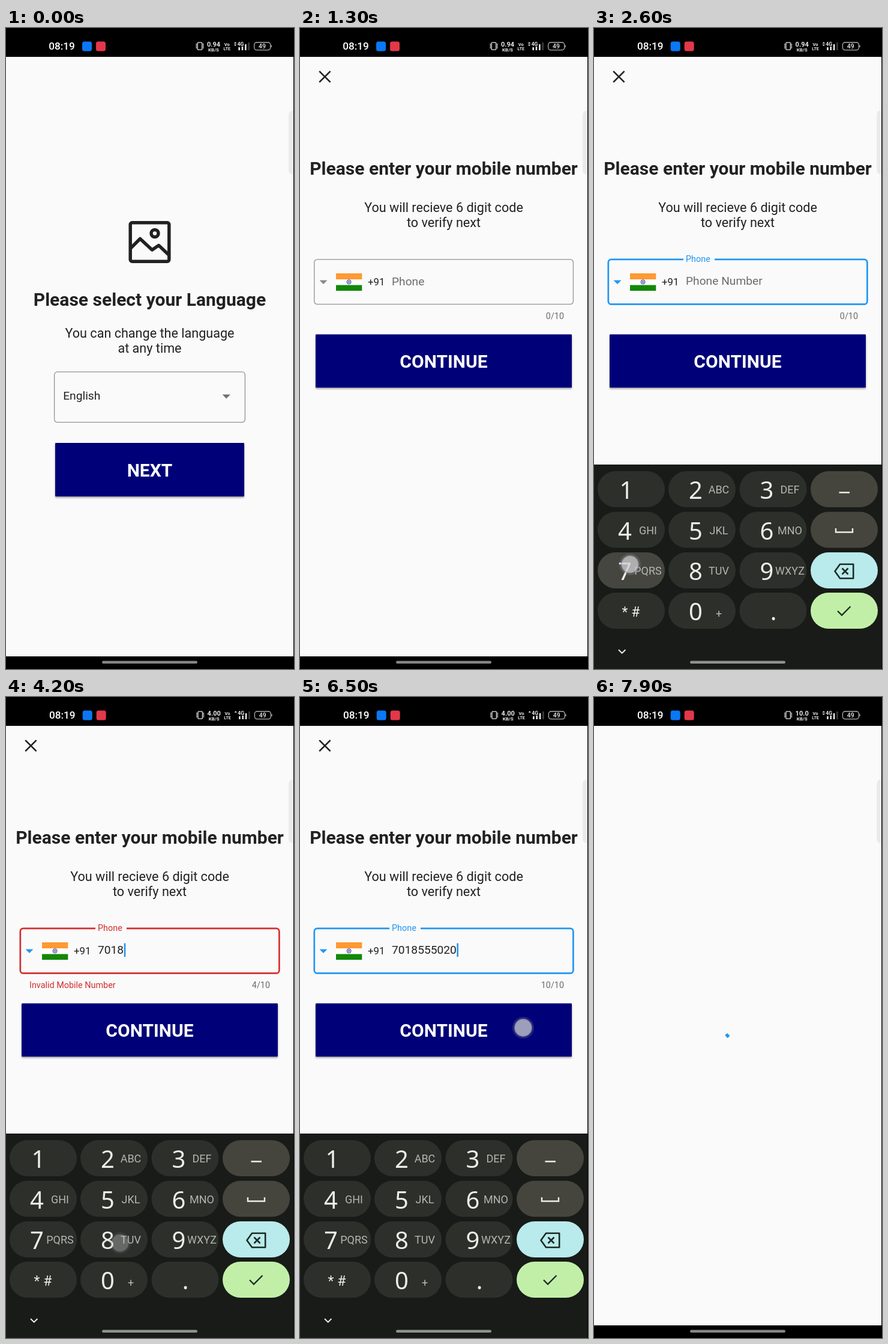
Write an HTML page that moves like this. It is 480 px wide and 1066 px high and loops after 8 s.

```html
<!DOCTYPE html>
<html lang="en">
<head>
<meta charset="utf-8">
<title>Phone sign-in</title>
<style>
  html, body { margin: 0; width: 100%; height: 100%; overflow: hidden; background: #000; }
  svg { display: block; width: 480px; height: 1066px; font: 19.2px Roboto, sans-serif; fill: #212121; }
  .mid { text-anchor: middle; }
  .end { text-anchor: end; }
  .title { font-size: 30px; font-weight: 700; text-anchor: middle; }
  .sub { font-size: 21.6px; text-anchor: middle; }
  .small { font-size: 14.4px; }
  .on { fill: #fff; }
  .grey { fill: #6c6c6c; }
  .line { fill: none; stroke: #212121; }
  .button { fill: #000078; filter: drop-shadow(0 2px 1.5px #0006); }
  .digit { font: 40px "Noto Sans", sans-serif; fill: #eceee8; text-anchor: middle; }
  .letters { font-size: 18px; fill: #b4b6b1; text-anchor: middle; }
  .bar { font-weight: 700; fill: #e8e8e8; text-anchor: middle; }
</style>
</head>
<body>
<svg viewBox="0 0 480 1066">
  <rect width="479" height="1066" fill="#fafafa"/>

  <g id="language">
    <g class="line" stroke-width="5.5" stroke-linejoin="round">
      <rect x="207.2" y="323.7" width="64.6" height="64.6" rx="3"/>
      <circle cx="248" cy="341.5" r="6"/>
      <path d="M207 367L223.5 350.5L243.5 369L254.5 361.5L272 378"/>
    </g>
    <text class="title" x="239.5" y="462">Please select your Language</text>
    <text class="sub" x="239.5" y="514.5">You can change the language</text>
    <text class="sub" x="239.5" y="540">at any time</text>
    <rect x="80.6" y="571.9" width="317.8" height="83.8" rx="5" class="line" style="stroke:#929292" stroke-width="1.3"/>
    <text x="95.2" y="618.3">English</text>
    <path d="M360.5 609.6h13.4l-6.7 6.7z" fill="#707070"/>
    <rect class="button" x="82" y="690" width="315" height="89" rx="1"/>
    <text class="title on" x="239.5" y="745.5">NEXT</text>
  </g>

  <g id="phone">
    <rect y="48" width="479" height="1000" fill="#fafafa"/>
    <path d="M32.2 71.8l18.4 18.4M50.6 71.8l-18.4 18.4" class="line" stroke-width="2.6"/>
    <text class="title" x="239.5" y="244">Please enter your mobile number</text>
    <text class="sub" x="239.5" y="305.7">You will recieve 6 digit code</text>
    <text class="sub" x="239.5" y="331">to verify next</text>
    <rect id="box" x="23.8" y="384.8" width="431.6" height="74.6" rx="5" fill="none"/>
    <rect id="gap" x="149" y="380" width="52" height="9" fill="#fafafa"/>
    <path id="arrow" d="M32.5 419.4h13l-6.5 6.6z"/>
    <rect x="60" y="408" width="43.3" height="10" fill="#ff9933"/>
    <rect x="60" y="418" width="43.3" height="9.5" fill="#fff"/>
    <rect x="60" y="427.5" width="43.3" height="9.5" fill="#138808"/>
    <circle cx="81.6" cy="422.3" r="3.5" fill="#c9c9ee" stroke="#3a3aa0"/>
    <circle cx="81.6" cy="422.3" r="1.1" fill="#3a3aa0"/>
    <text x="113" y="428.4" font-size="16.8">+91</text>
    <text id="label" x="153"></text>
    <text id="hint" class="grey" x="153" y="427">Phone Number</text>
    <text id="number" x="153" y="427.3"></text>
    <rect id="cursor" y="409.5" width="2.6" height="22.5" fill="#2196f3"/>
    <text id="error" class="small" x="39" y="484" fill="#d32f2f">Invalid Mobile Number</text>
    <text id="count" class="small grey end" x="440" y="484"></text>
    <rect class="button" x="26" y="509.5" width="427" height="88.5" rx="1"/>
    <text class="title on" x="239.5" y="564.5">CONTINUE</text>
  </g>

  <path id="spinner" fill="none" stroke="#2196f3" stroke-width="5.33" stroke-linecap="square"/>

  <rect y="1045" width="480" height="21" fill="#000"/>
  <path d="M479 137.5h-1.5q-6.5 0-6.5 8v89.5q0 8 6.5 8h1.5z" fill="#ebebeb"/>
  <g id="keyboard">
    <rect y="726" width="479" height="342" fill="#181b17"/>
    <g id="keys"></g>
    <g class="line" style="stroke:#eceee8" stroke-width="2.4">
      <path d="M408.5 772.5h17.5M403 832v6.5h28v-6.5"/>
      <path d="M41 1034l5.7 5.7l5.7-5.7" stroke-width="2"/>
    </g>
    <g class="line" style="stroke:#1c2a22" stroke-width="2.6">
      <path d="M401.5 903.5l8.5-11.7h22.2v23.4h-22.2zM413.5 898.5l10 10M423.5 898.5l-10 10" stroke-linejoin="round"/>
      <path d="M406 969.5l7 7l14.5-14.5" stroke-width="2.3"/>
    </g>
  </g>
  <rect x="160" y="1052.5" width="159" height="4.4" rx="2.2" fill="#fff" opacity=".52"/>

  <rect width="480" height="48" fill="#000"/>
  <g id="status">
    <text class="on" x="71.2" y="36.4" font-size="17.2" font-weight="500">08:19</text>
    <rect x="127" y="22.5" width="16" height="16" rx="3.5" fill="#0a78f5"/>
    <rect x="150" y="22.5" width="16" height="16" rx="3.5" fill="#e2384a"/>
    <g fill="none" stroke="#e8e8e8" stroke-width="1.3">
      <rect x="319.3" y="24.2" width="7.4" height="12" rx="1"/>
      <path d="M317.3 26v8M328.7 26v8" stroke-dasharray="2.4 .6"/>
      <rect x="413.7" y="24" width="27" height="12.6" rx="4" stroke="#b0b0b0"/>
      <path d="M442.3 28.5v3.5" stroke="#b0b0b0"/>
    </g>
    <text id="speed" class="bar" x="346" y="30.8" font-size="11"></text>
    <text class="bar" x="346" y="38.5" font-size="8">KB/S</text>
    <text class="bar" x="368.3" y="30" font-size="7.5">Vo</text>
    <text class="bar" x="368.3" y="37" font-size="7">LTE</text>
    <text class="bar" x="391" y="30" font-size="8.5">4G</text>
    <path d="M379.8 25.8l2.3-2.6l2.3 2.6z" fill="#e8e8e8"/>
    <path id="down" d="M379.8 27.4l2.3 2.6l2.3-2.6z" fill="#e8e8e8"/>
    <path d="M388.7 37v-5M394 37v-6M399.4 37v-10" stroke="#e8e8e8" stroke-width="2.6"/>
    <path d="M404.7 37v-13" stroke="#3c3c3c" stroke-width="2.6"/>
    <text class="bar" x="427" y="34.2" font-size="10.5" style="font-weight:500">49</text>
  </g>

  <g id="touch">
    <circle r="18" fill="#9a9aa8" opacity=".25"/>
    <circle r="14.3" fill="#d2d2d4" fill-opacity=".8" stroke="#8a8a96" stroke-width="1.2"/>
  </g>
</svg>
<script>
const $ = id => document.getElementById(id);
const set = (id, attrs) => { for (const k in attrs) $(id).setAttribute(k, attrs[k]); };
const show = (id, on) => set(id, { visibility: on ? 'visible' : 'hidden' });
const clamp = v => Math.min(1, Math.max(0, v));
const mix = (a, b, p) => a + (b - a) * p;
const easeOut = p => 1 - (1 - clamp(p)) ** 3;

// Keypad
const COLS = [6, 124, 242.5, 361], ROWS = [737, 804.5, 872, 939];
const LETTERS = ['+', '', 'ABC', 'DEF', 'GHI', 'JKL', 'MNO', 'PQRS', 'TUV', 'WXYZ'];
const SIDE = ['#45453d', '#45453d', '#b9eaec', '#c2efa8'];
const PLAIN = '#2d2f2b';
const keyCell = d => d ? [(d - 1) % 3, Math.floor((d - 1) / 3)] : [1, 3];
const text = (cls, x, y, s) => `<text class="${cls}" x="${x}" y="${y}">${s}</text>`;
let keys = '';
ROWS.forEach((y, r) => COLS.forEach((x, c) => {
  keys += `<rect id="key${c}${r}" x="${x}" y="${y}" width="112" height="60" rx="30" fill="${c > 2 ? SIDE[r] : PLAIN}"/>`;
}));
LETTERS.forEach((s, d) => {
  const [c, r] = keyCell(d), x = COLS[c], y = ROWS[r];
  keys += text('digit', x + (d == 1 ? 48 : 45.5), y + 46, d);
  keys += text('letters', x + 84, y + (d ? 37.3 : 41), s);
});
keys += `<text x="61.5" y="979" class="mid" font-size="23" fill="#eceee8">* #</text>` + text('digit', 299, 985, '.');
$('keys').innerHTML = keys;

// Taps: [time, x, y, digit]
const press = (time, d, dx = 62, dy = 34) => {
  const [c, r] = keyCell(d);
  return [time, COLS[c] + dx, ROWS[r] + dy, d];
};
const TAPS = [
  [100, 246, 729], [1700, 262, 424],
  press(2600, 7, 54, 20), press(3000, 0, 62, 22), press(3800, 1), press(4100, 8, 66, 36), press(4400, 5),
  press(4700, 5), press(5000, 5), press(5300, 0), press(5500, 2, 78, 38), press(6100, 0),
  [6500, 372, 550]
];
const DIGITS = TAPS.filter(tap => tap.length > 3);

// Material standard curve, cubic-bezier(.4, 0, .2, 1)
function standard(x) {
  x = clamp(x);
  let lo = 0, hi = 1;
  for (let i = 0; i < 20; i++) {
    const u = (lo + hi) / 2, v = 1 - u;
    if (1.2 * v * v * u + .6 * v * u * u + u ** 3 < x) lo = u; else hi = u;
  }
  return 3 * (1 - lo) * lo * lo + lo ** 3;
}

function drawSpinner(t) {
  show('spinner', t >= 6600);
  if (t < 6600) return;
  const time = (t - 6579) * 1.039, cycle = time / 1333 % 1;
  const head = standard(cycle * 2), tail = standard(cycle * 2 - 1);
  const start = Math.PI * (-.5 + 1.5 * tail + 2 * time / 2222 + .5 * cycle);
  const sweep = Math.max(1.5 * Math.PI * (head - tail), .01);
  const cy = mix(387, 546.6, easeOut((t - 6570) / 485));
  const at = a => `${239.5 + 23.8 * Math.cos(a)} ${cy + 23.8 * Math.sin(a)}`;
  set('spinner', { d: `M${at(start)}A23.8 23.8 0 ${+(sweep > Math.PI)} 1 ${at(start + sweep)}` });
}

function drawField(t) {
  const focus = t >= 1800, float = standard((t - 1700) / 200);
  const typed = DIGITS.filter(tap => t >= tap[0] + 100), n = typed.length;
  const bad = n > 0 && n < 10, accent = bad ? '#d32f2f' : '#2196f3';
  set('box', { stroke: focus ? accent : '#929292', 'stroke-width': focus ? 2.7 : 1.3 });
  set('arrow', { fill: focus ? '#2196f3' : '#888' });
  set('label', { y: mix(428, 389, float), 'font-size': mix(19.2, 14.4, float), fill: focus ? accent : '#6c6c6c' });
  set('hint', { opacity: n ? 0 : clamp((t - 1800) / 200) });
  show('gap', focus);
  show('error', bad);
  $('label').textContent = 'Phone';
  $('number').textContent = typed.map(tap => tap[3]).join('');
  $('count').textContent = n + '/10';
  const since = t - (n ? typed[n - 1][0] + 100 : 1700);
  set('cursor', { x: 153.6 + 10.78 * n, opacity: +(focus && since % 1000 < 500) });
}

function drawTouch(t) {
  const [time, x, y] = TAPS.filter(tap => tap[0] <= t).pop() || [-1e4, 0, 0];
  const alpha = [.9, .42, .12][(t - time) / 100] || 0;
  set('touch', { transform: `translate(${x} ${y})`, opacity: alpha });
  DIGITS.forEach(([, , , d]) => set('key' + keyCell(d).join(''), { fill: PLAIN }));
  const down = DIGITS.find(tap => tap[0] == t);
  if (down) set('key' + keyCell(down[3]).join(''), { fill: '#45463f' });
}

function draw(t) {
  const enter = clamp((t - 700) / 600);
  show('language', t < 1300);
  set('phone', {
    transform: `translate(0 ${249 * (1 - standard(enter))})`,
    opacity: t < 6600 ? enter ** 1.6 : 0
  });
  drawField(t);
  drawSpinner(t);
  const slide = t < 6000 ? 1 - easeOut((t - 1800) / 500) : easeOut((t - 6550) / 485);
  set('keyboard', { transform: `translate(0 ${341 * slide})` });
  show('keyboard', slide < 1);
  $('speed').textContent = t < 3600 ? '0.94' : t < 7400 ? '4.00' : '10.0';
  show('down', t < 3600 || t >= 7400);
  set('status', { transform: `translate(${t < 2600 ? 0 : .7} 0)` });
  drawTouch(t);
}

const begin = performance.now();
function tick() {
  draw(Math.floor((performance.now() - begin) % 8000 / 100) * 100);
  requestAnimationFrame(tick);
}
tick();
</script>
</body>
</html>
```
